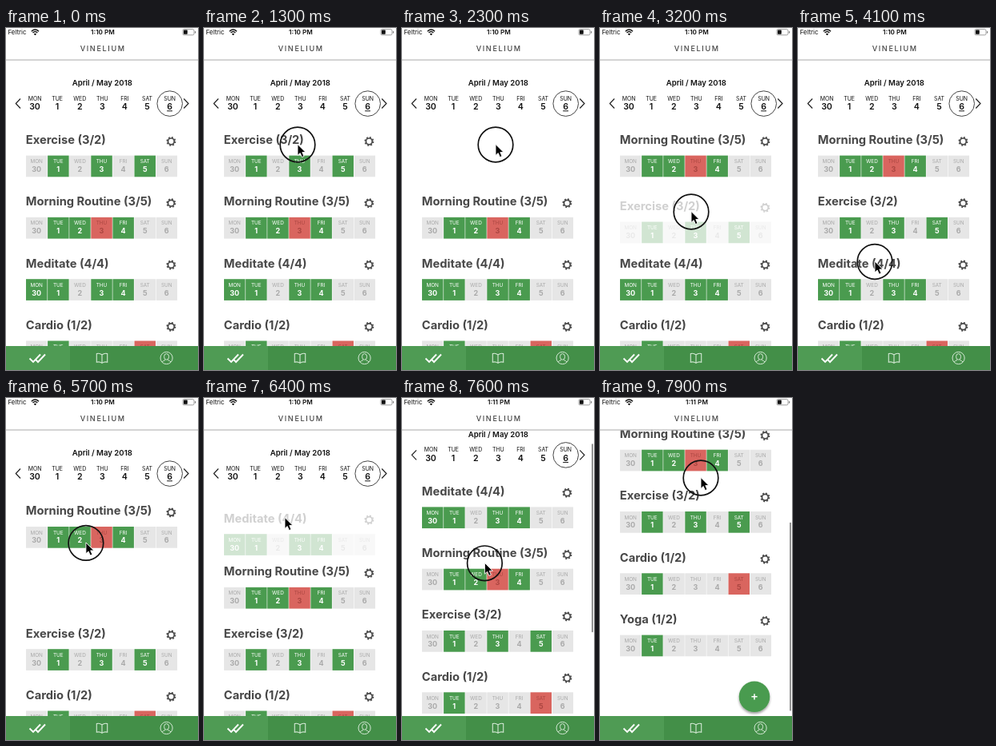
These frames come from a looping animation (240x428 px, 8000 ms). An HTML page:

```html
<!DOCTYPE html>
<html lang="en">
<head>
<meta charset="utf-8">
<title>Habit list</title>
<style>
html, body { margin: 0; height: 100%; overflow: hidden; background: #fff; }
svg { display: block; width: 100vw; height: 100vh; font-family: Inter, "Liberation Sans", sans-serif; }
</style>
</head>
<body>
<svg id="stage" viewBox="0 0 240 428"></svg>
<script>
const LOOP = 8000, PITCH = 77.3, FADE = 400;
const GREEN = '#4a9b4f', RED = '#d9655f', DARK = '#484848';
const DAYS = ['MON', 'TUE', 'WED', 'THU', 'FRI', 'SAT', 'SUN'];
const dateOf = day => day || 30;

// One letter per day: g done, r missed, - empty
const HABITS = [
  ['Exercise (3/2)', '-g-g-g-'],
  ['Morning Routine (3/5)', '-ggrg--'],
  ['Meditate (4/4)', 'gg-gg--'],
  ['Cardio (1/2)', '-g---r-'],
  ['Yoga (1/2)', '-g-----'],
];

// y is the middle of the capitals
const text = (x, y, size, str, fill = '#111', weight = 400, more = 'text-anchor="middle"') =>
  `<text x="${x}" y="${y + size * 0.364}" font-size="${size}" font-weight="${weight}" fill="${fill}" ${more}>${str}</text>`;
const rect = (x, y, w, h, fill, more = '') =>
  `<rect x="${x}" y="${y}" width="${w}" height="${h}" fill="${fill}" ${more}/>`;
const line = (d, stroke, width) =>
  `<path d="${d}" fill="none" stroke="${stroke}" stroke-width="${width}"/>`;

const gear = (x, y) => `<g transform="translate(${x} ${y})" fill="none" stroke="${DARK}">
  <circle r="3.9" stroke-width="1.7"/>
  <circle r="5.2" stroke-width="1.5" stroke-dasharray="2.04 2.04"/></g>`;

function cell(mark, day) {
  const x = 25 + day * 27.1, mid = x + 13.2;
  const [back, ink] = { g: [GREEN, '#fff'], r: [RED, '#ab4641'], '-': ['#e6e6e6', '#a9a9a9'] }[mark];
  return rect(x, 159.6, 26.5, 26.7, back) +
    text(mid, 166.8, 6.4, DAYS[day], ink) + text(mid, 176.7, 9, dateOf(day), ink, 700);
}

const habit = ([name, marks]) => '<g class="habit">' +
  text(24.8, 139.6, 14.7, name, DARK, 700, '') + gear(206.4, 141.9) + [...marks].map(cell).join('') + '</g>';

const week = DAYS.map((name, day) => {
  const x = 36 + day * 28.1;
  return text(x, 88, 6.9, name) + text(x, 98.4, 10.6, dateOf(day), '#111', 600);
}).join('');

const calendar = text(120.3, 69, 9.6, 'April / May 2018', '#111', 600) + week +
  line('M18 88.5L12.3 94.5L18 100.5M222.3 88.5L228 94.5L222.3 100.5', '#222', 1.2) +
  line('M201.2 103.8h6.8', '#111', 1) +
  '<circle cx="204.7" cy="94.6" r="15.8" fill="none" stroke="#444"/>';

const addButton = `<circle cx="193" cy="546" r="19.3" fill="${GREEN}" filter="url(#shadow)"/>` +
  line('M189.4 546h7.2M193 542.4v7.2', '#fff', 1.5);

const statusBar = text(2.5, 5.2, 7.9, 'Feltric', '#111', 400, '') +
  line('M31.8 4.2Q36.4 -.2 41 4.2M33.5 6Q36.4 3.2 39.3 6', '#111', 1.4) +
  '<path d="M34.8 7.4Q36.4 5.9 38 7.4L36.4 9.2Z"/>' +
  text(121, 5.2, 8.2, '1:10 PM', '#111', 600, 'id="clock" text-anchor="middle"') +
  rect(221, 1.6, 14, 7.2, '#fff', 'rx="1.6" stroke="#777" stroke-width=".7"') +
  rect(222, 2.6, 4.8, 5.2, '#111', 'rx=".7"') + rect(236, 4, 1.2, 2.5, '#777', 'rx=".6"');

const header = rect(0, 0, 240, 40, '#fff') + statusBar +
  text(121.2, 26, 9.1, 'VINELIUM', '#444', 500, 'text-anchor="middle" letter-spacing="1.65"') +
  rect(0, 39.4, 240, 1.2, '#b8b8b8');

const tabBar = rect(0, 398, 240, 30, '#438f48') + rect(0, 398, 80, 30, '#4f9b54') +
  line('M29.5 413.5L34 418L43 408.5M36.5 414.3L40 418L49 408.5', '#fff', 1.9) +
  line('M120 409Q117 406.6 113.3 407.6V418.2Q117 417.2 120 419.4Q123 417.2 126.7 418.2V407.6Q123 406.6 120 409V419.4', '#d3e8d4', 1.1) +
  `<g fill="none" stroke="#d3e8d4"><circle cx="200.6" cy="413" r="7.6"/>
   <ellipse cx="200.6" cy="411.4" rx="3" ry="3.8"/><path d="M195.2 418Q196 416.4 199 415.6M206 418Q205.2 416.4 202.2 415.6"/></g>`;

const pointer = `<g id="pointer"><circle id="ring" r="21.8" fill="none" stroke="#111" stroke-width="1.7"/>
  <path d="M0 -.5V13.4L3.2 10.5L5.4 15.6L8 14.5L5.8 9.5H10Z" fill="#000" stroke="#fff" stroke-width=".9"/></g>`;

const $ = id => document.getElementById(id);
$('stage').innerHTML = `<defs>
  <clipPath id="view"><rect y="40" width="240" height="358"/></clipPath>
  <filter id="shadow" x="-30%" y="-30%" width="160%" height="170%">
    <feDropShadow dx="0" dy="2" stdDeviation="1.8" flood-opacity=".4"/></filter></defs>
  <g clip-path="url(#view)"><g id="content">${calendar}${HABITS.map(habit).join('')}${addButton}</g></g>
  ${rect(237.2, 42, 1.6, 236, '#777', 'id="bar" rx=".8"')}${header}${tabBar}${pointer}`;
const rows = [...document.querySelectorAll('.habit')];

const ramp = (t, start, end) => Math.min(1, Math.max(0, (t - start) / (end - start)));
const ease = (t, start, end) => {
  const p = ramp(t, start, end);
  return p * p * (3 - 2 * p);
};
const show = (el, on) => el.setAttribute('visibility', on ? 'visible' : 'hidden');

// A lifted habit fades out, its neighbours close up, and it fades in settling from where it was dropped
const DRAGS = [
  { habit: 0, from: 0, to: 1, lift: 1500, start: 2300, stop: 3100, drop: 3100, travel: 84 },
  { habit: 2, from: 2, to: 0, lift: 4200, start: 4900, stop: 6050, drop: 6300, travel: -142 },
];
const HOME = { x: 117, y: 146 };
const MOVES = [
  { start: 2300, stop: 3100, x: 114, y: 230 },
  { start: 3250, stop: 3600, x: 98, y: 276 },
  { start: 3750, stop: 3900, x: 96, y: 292.5 },
  { start: 4900, stop: 6050, x: 101, y: 150 },
  { start: 6450, stop: 7100, x: 90, y: 270 },
  { start: 7390, stop: 7900, x: 126, y: 100 },
];
const PRESSES = [[1200, 3250], [4000, 6250], [7200, LOOP]];

function layout(t) {
  const slots = HABITS.map((_, i) => i), alphas = HABITS.map(() => 1);
  for (const { habit, from, to, lift, start, stop, drop, travel } of DRAGS) {
    const way = Math.sign(to - from), shift = travel / PITCH;
    const moved = Math.abs(shift) * ease(t, start, stop);
    slots.forEach((slot, i) => {
      const gap = (slot - from) * way;
      if (i !== habit && gap > 0 && gap <= Math.abs(to - from)) slots[i] -= way * ease(moved, gap - 0.6, gap - 0.2);
    });
    if (t >= drop) slots[habit] = to + (from + shift - to) * (1 - ease(t, drop, drop + FADE));
    alphas[habit] = 1 - ramp(t, lift, lift + FADE) + ramp(t, drop, drop + FADE);
  }
  return { slots, alphas };
}

function pointerAt(t) {
  return MOVES.reduce((at, { start, stop, x, y }) => {
    const p = ease(t, start, stop);
    return { x: at.x + (x - at.x) * p, y: at.y + (y - at.y) * p };
  }, HOME);
}

function draw(t) {
  const { slots, alphas } = layout(t);
  rows.forEach((row, i) => {
    row.setAttribute('transform', `translate(0 ${slots[i] * PITCH})`);
    row.setAttribute('opacity', alphas[i]);
  });

  const scroll = 191 * ease(t, 7490, LOOP);
  $('content').setAttribute('transform', `translate(0 ${-scroll})`);
  $('bar').setAttribute('y', 42 + scroll * 0.66);
  show($('bar'), scroll > 0);

  const { x, y } = pointerAt(t);
  $('pointer').setAttribute('transform', `translate(${x} ${y})`);
  show($('pointer'), t >= 1100);
  show($('ring'), PRESSES.some(([down, up]) => t >= down && t < up));
  $('clock').textContent = t < 6700 ? '1:10 PM' : '1:11 PM';
}

function frame() {
  draw(performance.now() % LOOP);
  requestAnimationFrame(frame);
}
frame();
</script>
</body>
</html>
```
